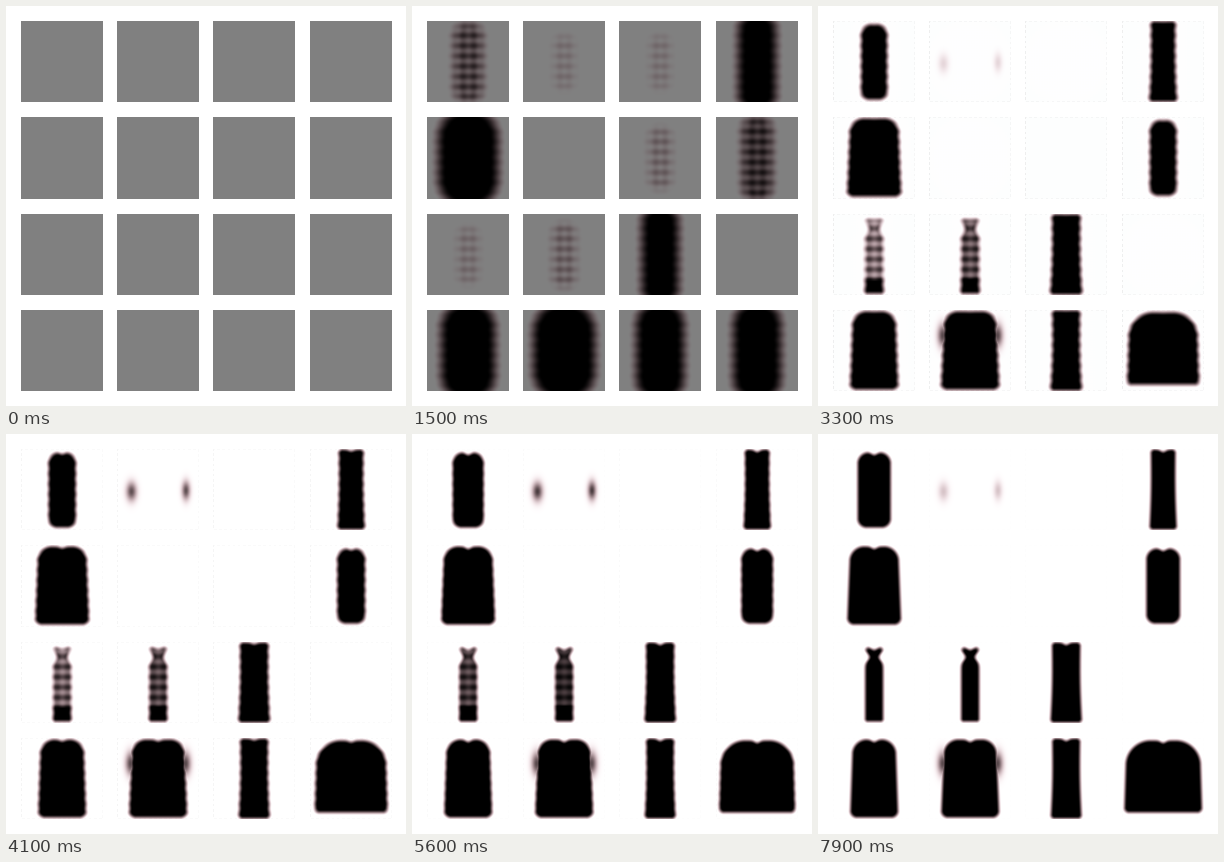
Recreate the animation shown at these times as an HTML page with a canvas. Size 400 by 400 pixels, loop 8 s.

```html
<!DOCTYPE html>
<html lang="en">
<head>
<meta charset="utf-8">
<title>Emerging silhouettes</title>
<style>
html, body { margin: 0; width: 100%; height: 100%; overflow: hidden; background: #fff; }
canvas { display: block; width: 400px; height: 400px; }
</style>
</head>
<body>
<canvas id="stage" width="400" height="400"></canvas>
<script>
const ctx = document.getElementById('stage').getContext('2d');
const LOOP = 8000, STEP = 100, HOLD = 300;
const CENTER = 40.7, MIDDLE = 41, PITCH = 10.25;

// Rounded boxes: vertical extent, corner radii, widening downwards, narrow waist.
const column = { top: 0, bottom: 80, shoulder: 4, hem: 4, taper: 0.1, waist: 0.06 };
const coat = { top: 1, bottom: 79, shoulder: 14, hem: 7, taper: 0.12, waist: 0 };
const dress = { top: 3, bottom: 78, shoulder: 11, hem: 9, taper: 0, waist: 0, grow: 3.5 };
const dome = { top: 2, bottom: 74, shoulder: 24, hem: 5, taper: 0.06, waist: 0, grow: 3 };
const bottle = { top: 5, bottom: 79, shoulder: 4, hem: 3, taper: 0, waist: 0, neck: 4 };

// bud is the half width of the first blur, half that of the finished shape.
const figures = [
  { kind: dress, bud: 14, half: 13 },
  { bud: 9, specks: true },
  { bud: 9 },
  { kind: column, bud: 19, half: 13 },
  { kind: coat, bud: 30, half: 25.5 },
  { bud: 0 },
  { bud: 10.5, light: 0.15 },
  { kind: dress, bud: 15, half: 13.3 },
  { kind: bottle, bud: 9.5, half: 9, ink: 0.52 },
  { kind: bottle, bud: 11, half: 9, ink: 0.68 },
  { kind: column, bud: 18.5, half: 15 },
  { bud: 0 },
  { kind: coat, bud: 27, half: 22.7 },
  { kind: coat, bud: 31, half: 27.5, sleeves: true },
  { kind: column, bud: 24, half: 14.7 },
  { kind: dome, bud: 24, half: 34.8 }
];

const clamp = v => Math.max(0, Math.min(1, v));
const mix = (a, b, k) => a + (b - a) * k;
const smooth = (a, b, v) => { const k = clamp((v - a) / (b - a)); return k * k * (3 - 2 * k); };
const bump = (v, peak, spread) => Math.exp(-(((v - peak) / spread) ** 2));
const decay = (t, from, span) => Math.exp(-Math.max(0, t - from) / span);
const wave = (v, period, peak) => Math.cos(2 * Math.PI * (v - peak) / period);
const spot = (x, y, cx, cy, rx, ry) => bump(x, cx, rx) * bump(y, cy, ry);

// Values shared by all cells at time t.
function moodAt(t) {
  return {
    level: 128 + 127 * smooth(1700, 3400, t),
    halo: 36 * bump(t, 2600, 350),
    tint: 13 * bump(t, 2600, 400),
    soft: 2.6 + 5.4 * decay(t, 1500, 900),
    lobe: 0.5 * (1 - t / LOOP),
    rim: 20 * smooth(2000, 3000, t) * decay(t, 2800, 2000),
    notch: 2.2 * smooth(3000, 4800, t),
    ramp: clamp((t - 200) / 1300) ** 3,
    form: clamp((t - 1500) / 1100),
    swell: bump(t, 2600, 450),
    grown: smooth(3000, 7000, t),
    filled: clamp((t - 2800) / 5000),
    specks: 0.5 * bump(t, 2600, 400) + 0.85 * smooth(2900, 4600, t) * (1 - 0.75 * smooth(4800, 8000, t)),
    sleeves: 0.7 * smooth(1800, 3000, t)
  };
}

// Box and opacity of one figure: a blurred bud that settles into its kind.
function poseOf({ kind, bud, half, ink = 1 }, mood) {
  const reach = Math.min(50, 2.6 * bud + 3);
  const early = Math.min(1, (bud / 17) ** 3.5 * mood.ramp);
  const pose = {
    top: MIDDLE - reach, bottom: MIDDLE + reach, shoulder: bud, hem: bud,
    half: bud * (0.7 + 0.3 * mood.ramp), opacity: early * (1 - smooth(0, 0.6, mood.form))
  };
  if (!kind) return pose;
  const goal = {
    ...kind,
    top: kind.top - 2 * mood.swell,
    bottom: kind.bottom + 2 * mood.swell,
    half: half + (kind.grow || 0) * mood.grown
  };
  for (const key of ['top', 'bottom', 'shoulder', 'hem', 'half']) {
    pose[key] = mix(pose[key], goal[key], mood.form);
  }
  pose.opacity = mix(early, mix(ink, 1, mood.filled), mood.form);
  return pose;
}

function halfWidth(pose, kind, f, mood) {
  if (!kind) return pose.half;
  const shape = kind.taper * (f - 0.5) - kind.waist * Math.sin(Math.PI * f);
  const neck = (kind.neck || 0) * bump(f, 0.13, 0.07);
  const flare = 3 * mood.swell * smooth(0.75, 0.95, f);
  return pose.half * (1 + shape * mood.form) - neck * mood.form + flare;
}

// Distance to the edge of a rounded box, positive inside.
function depthIn(dx, dy, half, halfHeight, radius) {
  const r = Math.min(radius, half);
  const qx = dx - half + r, qy = dy - halfHeight + r;
  return r - Math.hypot(Math.max(qx, 0), Math.max(qy, 0)) - Math.min(Math.max(qx, qy), 0);
}

function drawCell(figure, index, mood) {
  const col = index % 4, row = index >> 2;
  const w = 82, h = row === 1 ? 82 : 81;
  const { kind, light = 1 } = figure;
  const image = ctx.createImageData(w, h);
  const pose = poseOf(figure, mood);
  const mid = (pose.top + pose.bottom) / 2;
  const halfHeight = (pose.bottom - pose.top) / 2;

  for (let y = 0; y < h; y++) {
    const f = clamp((y - pose.top) / (2 * halfHeight));
    const rowWave = wave(y, PITCH, 14);
    const half = halfWidth(pose, kind, f, mood) + mood.lobe * rowWave;
    const base = figure.ink ? 0.5 * mood.form * smooth(0.76, 0.86, f) : 0;
    const density = Math.min(1, pose.opacity + base);
    const radius = y < mid ? pose.shoulder : pose.hem;

    for (let x = 0; x < w; x++) {
      const dx = Math.abs(x - CENTER);
      const dip = y < mid ? mood.notch * bump(dx, 0, 4) : 0;
      const depth = depthIn(dx, Math.abs(y - mid) + dip, half, halfHeight, radius);
      const dots = 0.7 * rowWave + 0.3 * wave(x, PITCH, 3.5 * PITCH);
      let cover = smooth(-mood.soft, mood.soft, depth) * clamp(density + density * (1 - density) * 0.9 * dots);
      if (figure.specks) {
        const dark = spot(x, y, 14, 42, 5, 9) + spot(x, y, 68.5, 41, 4, 9);
        cover = Math.max(cover, clamp(mood.specks * dark));
      }
      if (figure.sleeves) {
        cover = Math.max(cover, mood.sleeves * spot(dx, y, 27.5, 25, 5, 11));
      }

      const glow = kind
        ? Math.exp(-Math.max(0, -depth - 3) / 15)
        : light * (1 - smooth(34, 54, Math.hypot(dx, y - MIDDLE)));
      let level = mood.level + mood.halo * glow;
      level += mood.halo * 0.08 * (wave(x, PITCH / 4, 0) + wave(y, PITCH / 4, 0));
      const side = x === 0 ? 1 : (y === 0 || x === w - 1 || y === h - 1) ? 0.5 : 0;
      if (wave(x + y, PITCH / 2, 0) > 0) level -= mood.rim * side;

      const i = (y * w + x) * 4;
      image.data[i] = (level - mood.tint) * (1 - cover ** 1.2);
      image.data[i + 1] = level * (1 - cover ** 0.95);
      image.data[i + 2] = (level + mood.tint * 0.2) * (1 - cover);
      image.data[i + 3] = 255;
    }
  }
  ctx.putImageData(image, Math.floor(15 + 96.4 * col), Math.floor(15.3 + 96.4 * row));
}

function draw(t) {
  const mood = moodAt(t);
  ctx.fillStyle = '#fff';
  ctx.fillRect(0, 0, 400, 400);
  figures.forEach((figure, index) => drawCell(figure, index, mood));
}

const start = performance.now();
let shown = -1;
function tick() {
  const elapsed = (performance.now() - start) % LOOP;
  const t = elapsed < HOLD ? 0 : Math.floor(elapsed / STEP) * STEP;
  if (t !== shown) draw(shown = t);
  requestAnimationFrame(tick);
}
tick();
</script>
</body>
</html>
```
